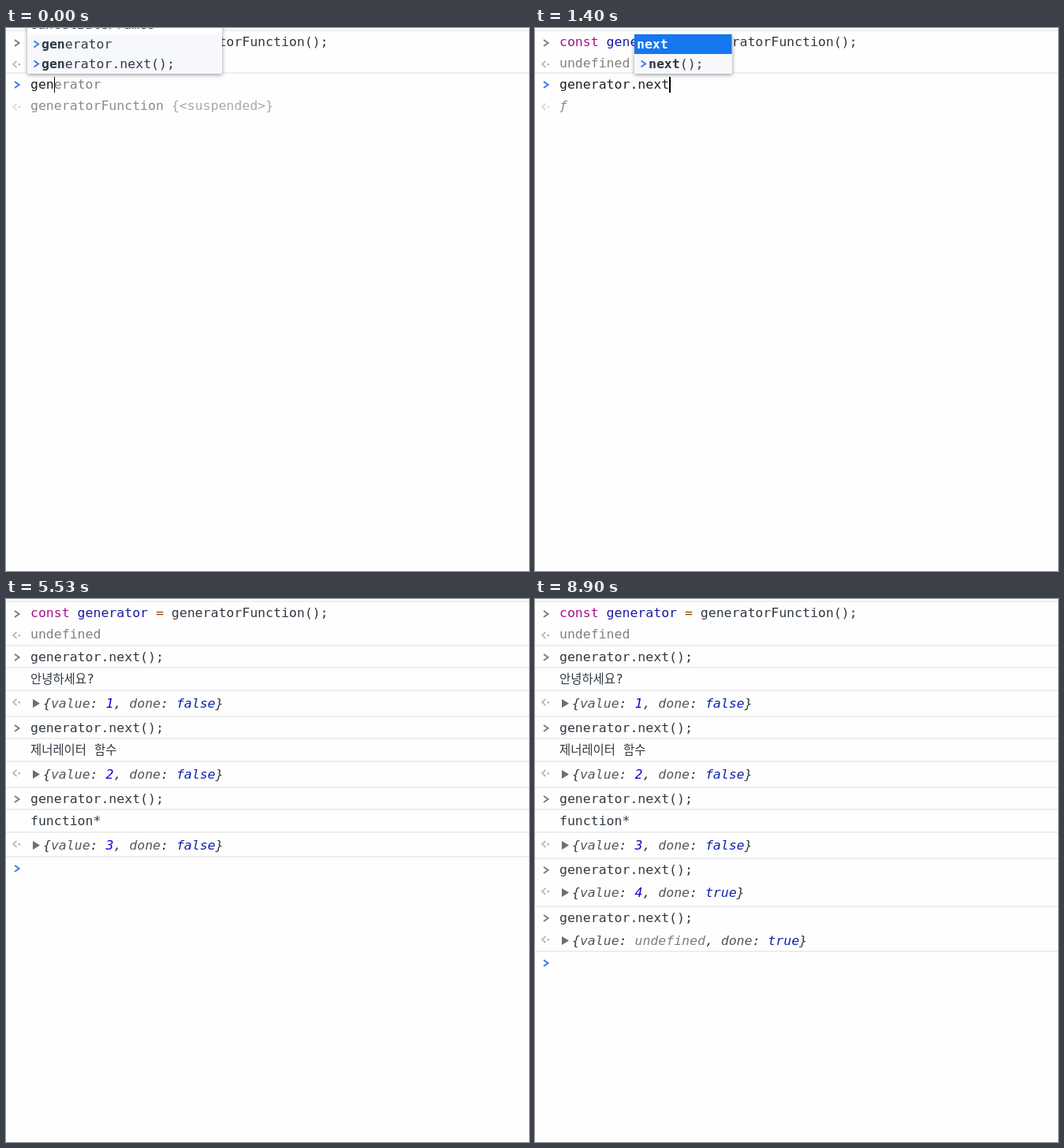
Recreate the animation shown at these times as an HTML page with a canvas. Size 663 px wide and 689 px high, loop 9160 ms.

```html
<!DOCTYPE html>
<html lang="ko">
<head>
<meta charset="utf-8">
<title>Generator console</title>
<style>
  html, body { margin: 0; width: 100%; height: 100%; overflow: hidden; background: #fefefe; }
  canvas { display: block; }
</style>
</head>
<body>
<canvas id="stage" width="663" height="689"></canvas>
<script>
const ctx = document.getElementById('stage').getContext('2d');
const W = 663, H = 689, LOOP = 9160;
const SIZE = 16.5, CH = SIZE * 0.60205, LEFT = 31, ROW = 25.07;
const MONO = '"DejaVu Sans Mono", "Noto Sans Mono", monospace';
const HANGUL = '15.4px "Noto Sans CJK KR", "Noto Sans CJK", sans-serif';
const INK = '#303942', GRAY = '#808080', BLUE = '#3b7ded', NUM = '#1c00cf', BOOL = '#0d22aa';
const CALL = 'generator.next();';

// y: top rule, prompt: rule of the following prompt, recall: when the call is fetched from history
const entries = [
  { y: 59, prompt: 147, sent: 2160, done: 2230, log: '안녕하세요?', value: '1', flag: 'false' },
  { y: 149, prompt: 237, recall: 3200, sent: 3700, done: 3760, log: '제너레이터 함수', value: '2', flag: 'false' },
  { y: 239, prompt: 327, recall: 4460, sent: 5000, done: 5060, log: 'function*', value: '3', flag: 'false' },
  { y: 329, prompt: 387, recall: 5700, sent: 6200, done: 6200, value: '4', flag: 'true' },
  { y: 390, prompt: 447, recall: 7000, sent: 7530, done: 7560, value: 'undefined', flag: 'true' }
];
const blinkOff = [[2700, 3200], [4260, 4460], [5530, 5700], [6700, 7000], [8030, 8560], [8900, LOOP]];

// time, characters typed of CALL
const typing = [[0, 3], [60, 4], [200, 5], [290, 6], [380, 7], [470, 8], [560, 9], [800, 10],
  [960, 11], [1130, 12], [1260, 13], [1400, 14], [1600, 15], [1680, 16], [1760, 17]];

const members = ['constructor', 'next', 'return', 'throw', 'hasOwnProperty', 'isPrototypeOf',
  'propertyIsEnumerable', 'toLocaleString', 'toString', 'valueOf', '__defineGetter__',
  '__defineSetter__', '__lookupGetter__', '__lookupSetter__', '__proto__'];

function text(str, x, y, color = INK, style = '') {
  ctx.font = `${style} ${SIZE}px ${MONO}`;
  ctx.fillStyle = color;
  ctx.fillText(str, x, y);
  return x + str.length * CH;
}

function spans(parts, x, y, style) {
  for (const [str, color] of parts) x = text(str, x, y, color, style);
}

function logText(str, y) {
  let x = LEFT;
  for (const c of str) {
    if (c >= '가') {
      ctx.font = HANGUL;
      ctx.fillStyle = INK;
      ctx.fillText(c, x, y);
      x += 14.2;
    } else {
      x = text(c, x, y);
    }
  }
}

function rule(y) {
  ctx.fillStyle = '#eeeeee';
  ctx.fillRect(0, y - 1, W, 2);
}

function stroke(points, color, width) {
  ctx.beginPath();
  points.forEach(([x, y]) => ctx.lineTo(x, y));
  ctx.strokeStyle = color;
  ctx.lineWidth = width;
  ctx.stroke();
}

function chevron(x, y, color) {
  stroke([[x, y - 4], [x + 5.5, y], [x, y + 4]], color, 2.1);
}

function resultIcon(y, color = '#b8b8b8') {
  stroke([[13.5, y - 4], [9, y], [13.5, y + 4]], color, 1.7);
  ctx.fillStyle = color;
  ctx.fillRect(15.5, y - 1, 2.5, 2.5);
}

function result(e, y) {
  resultIcon(y - 7);
  ctx.fillStyle = '#6e6e6e';
  ctx.beginPath();
  ctx.moveTo(34, y - 11);
  ctx.lineTo(43, y - 5.5);
  ctx.lineTo(34, y);
  ctx.fill();
  spans([['{', INK], ['value', '#565656'], [': ', INK],
    [e.value, e.value === 'undefined' ? GRAY : NUM], [', ', INK],
    ['done', '#565656'], [': ', INK], [e.flag, BOOL], ['}', INK]], 47, y, 'italic');
}

function drawEntry(e, t) {
  rule(e.y);
  chevron(11, e.y + 15, GRAY);
  text(CALL, LEFT, e.y + 20);
  if (e.log) {
    rule(e.y + 28);
    logText(e.log, e.y + 48);
  }
  if (t < e.done) return;
  if (e.log) rule(e.y + 57);
  result(e, e.y + (e.log ? 79 : 49));
}

function caret(count, y) {
  const x = LEFT + count * CH, x0 = Math.round(x);
  ctx.fillStyle = '#000';
  ctx.fillRect(x0, y, Math.round(x + 1.5) - x0, 20);
}

function drawPrompt(y, typed, ghost, showCaret, color = BLUE) {
  rule(y);
  chevron(11, y + 15, color);
  text(ghost, text(typed, LEFT, y + 20, '#1f1f1f'), y + 20, GRAY);
  if (showCaret) caret(typed.length, y + 5);
}

// rows: { label, bold, past, active, note }
function popup(x, y, w, rows) {
  const h = Math.round(rows.length * ROW);
  ctx.save();
  ctx.shadowColor = 'rgba(0,0,0,0.4)';
  ctx.shadowBlur = 5;
  ctx.shadowOffsetY = 1.5;
  ctx.fillStyle = '#fff';
  ctx.fillRect(x, y, w, h);
  ctx.restore();
  rows.forEach((r, i) => {
    const top = Math.round(y + i * ROW), base = top + 18;
    if (r.past || r.active) {
      ctx.fillStyle = r.active ? '#1677ee' : '#f7f8fb';
      ctx.fillRect(x, top, w, 25);
    }
    if (r.past) chevron(x + 8.5, top + 12.5, BLUE);
    const color = r.active ? '#fff' : INK, bold = r.bold || 0;
    const mid = text(r.label.slice(0, bold), x + (r.past ? 18 : 3), base, color, 'bold');
    text(r.label.slice(bold), mid, base, color);
    if (r.note) text(r.note, x + w - 7 - r.note.length * CH, base, '#9c9c9c');
  });
}

function drawFirst(t) {
  const n = typing.filter(([at]) => at <= t).pop()[1];
  const typed = CALL.slice(0, n);
  let ghost = '';
  if (n < 10) ghost = 'generator'.slice(n);
  else if (n === 10) ghost = t < 830 ? '' : 'constructor';
  else if (n < 14) ghost = 'next'.slice(n - 10);
  drawPrompt(57, typed, ghost, true, n === 10 ? '#78a9f5' : BLUE);

  if (n < 15) {
    resultIcon(100, '#d6d6d6');
    if (n < 11) spans([['generatorFunction ', '#8b8b8b'], ['{<suspended>}', '#a8a8a8']], LEFT, 104);
    else text('ƒ', LEFT, 104, '#8b8b8b', 'italic');
  }

  if (n < 10) {
    const top = n < 5 ? { label: 'cancelIdleFrames' } : { label: 'generatorFunction', bold: n };
    popup(27, -17, n === 3 ? 247 : 223, [
      top,
      { label: 'generator', bold: n, past: true },
      { label: CALL, bold: n, past: true }
    ]);
  } else if (n === 10 && t >= 830) {
    const rows = members.map((label, i) => ({ label, active: i === 0, note: i === 4 ? 'Object' : '' }));
    popup(126, 86, 243, [...rows, { label: 'next();', past: true }]);
  } else if (n > 10 && n < 15) {
    popup(126, 8, 123.5, [
      { label: 'next', bold: n - 10, active: true },
      { label: 'next();', bold: n - 10, past: true }
    ]);
  }
}

function draw(t) {
  ctx.fillStyle = '#fefefe';
  ctx.fillRect(0, 0, W, H);
  rule(3);
  chevron(11, 19, GRAY);
  spans([['const ', '#aa0d91'], ['generator ', '#1a1aa6'], ['= ', '#994500'],
    ['generatorFunction();', INK]], LEFT, 23);
  resultIcon(46);
  text('undefined', LEFT, 50, GRAY);

  const sent = entries.filter(e => e.sent <= t);
  sent.forEach(e => drawEntry(e, t));
  if (!sent.length) return drawFirst(t);

  const last = sent[sent.length - 1], next = entries[sent.length];
  if (t < last.done) return;
  const typed = next && t >= next.recall ? CALL : '';
  drawPrompt(last.prompt, typed, '', !blinkOff.some(([a, b]) => t >= a && t < b));
}

const start = performance.now();
function tick() {
  draw((performance.now() - start) % LOOP);
  requestAnimationFrame(tick);
}
tick();
</script>
</body>
</html>
```
